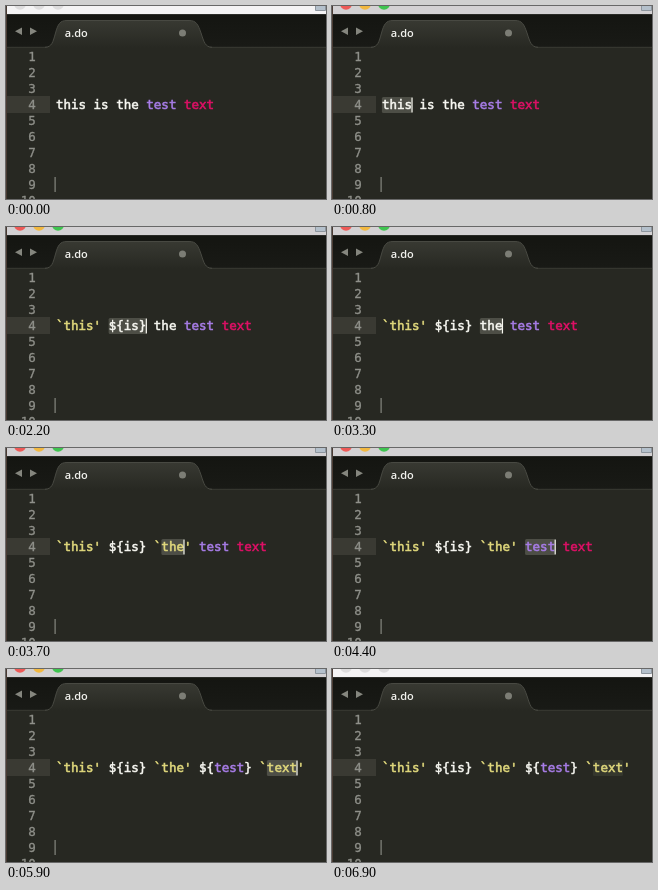
Animation, 320 px wide and 193 px high, one loop 7000 ms. Source, as an HTML page:

```html
<!DOCTYPE html>
<html lang="en">
<head>
<meta charset="utf-8">
<title>Wrapping words in an editor</title>
<style>
html, body { margin: 0; width: 100%; height: 100%; overflow: hidden; background: #272822; }
svg { display: block; width: 320px; height: 193px; }
.mono { font: 12.5px "DejaVu Sans Mono", monospace; }
#code text { stroke-width: .55px; }
#lines { fill: #8f908a; stroke: #8f908a; stroke-width: .3px; text-anchor: end; }
</style>
</head>
<body>
<svg viewBox="0 0 320 193">
  <defs>
    <linearGradient id="tabFill" x1="0" y1="0" x2="0" y2="1">
      <stop offset="0" stop-color="#383932"/>
      <stop offset="1" stop-color="#272822"/>
    </linearGradient>
    <linearGradient id="barFill" x1="0" y1="0" x2="0" y2="1">
      <stop offset="0" stop-color="#141511"/>
      <stop offset="1" stop-color="#191a16"/>
    </linearGradient>
  </defs>
  <rect width="320" height="193" fill="#272822"/>
  <rect id="title" width="320" height="8.300"/>
  <g id="lights">
    <circle cx="14" cy="-2.300" r="6"/>
    <circle cx="33" cy="-2.300" r="6"/>
    <circle cx="52" cy="-2.300" r="6"/>
  </g>
  <path d="M309.500 0V4.500H319.500V0" fill="#b4c0cb" stroke="#8d959d"/>
  <rect y="8.300" width="320" height="33" fill="url(#barFill)"/>
  <path d="M0 41.300H320" stroke="#3a3b34"/>
  <path d="M39 42C46 41 47 36 49.500 27C52 18 54 14.500 61 14.500H183C190 14.500 192 18 195 27C198 36 199 41 206 42Z" fill="url(#tabFill)"/>
  <path d="M39 41.300C46 41 47 36 49.500 27C52 18 54 14.500 61 14.500H183C190 14.500 192 18 195 27C198 36 199 41 206 41.300" fill="none" stroke="#484942"/>
  <path d="M16 21.500V29L9 25.250ZM24 21.500V29L31 25.250Z" fill="#85867e"/>
  <text x="58.800" y="31" font-family="Open Sans, sans-serif" font-size="11" font-weight="600" fill="#f2f2ee">a.do</text>
  <circle cx="176.500" cy="27" r="3.500" fill="#7c7d75"/>
  <rect y="90" width="44" height="17" fill="#3a3a33"/>
  <g id="lines" class="mono"></g>
  <rect id="sel" y="91" height="16" rx="1.500"/>
  <g id="code" class="mono"></g>
  <rect id="caret" y="91.500" width="1.200" height="15" fill="#f8f8f0"/>
  <rect x="48.500" y="171" width="1.200" height="15" fill="#85867f"/>
  <path d="M.5 0V193" stroke="#4b3c34"/>
</svg>
<script>
const LOOP = 7000, LEFT = 49.9, CELL = 7.535;
const WHITE = '#f8f8f2', YELLOW = '#e0d87c', PURPLE = '#a87de8', PINK = '#de1066';
const words = [
  ['this', WHITE, 'quote'],
  ['is', WHITE, 'brace'],
  ['the', WHITE, 'quote'],
  ['test', PURPLE, 'brace'],
  ['text', PINK, 'quote']
];

// start time, words wrapped, selected word, window active
const steps = [
  [0, 0, -1, false],
  [200, 0, -1, true],
  [600, 0, 0, true],
  [1300, 1, 0, true],
  [1700, 1, 1, true],
  [2000, 2, 1, true],
  [2900, 2, 2, true],
  [3500, 3, 2, true],
  [4100, 3, 3, true],
  [4600, 4, 3, true],
  [5300, 4, 4, true],
  [5900, 5, 4, true],
  [6600, 5, 4, false]
];

const $ = id => document.getElementById(id);
const put = (node, attrs) => {
  for (const key in attrs) node.setAttribute(key, attrs[key]);
  return node;
};
const colX = col => LEFT + col * CELL;

function addText(parent, text, x, y, fill) {
  const node = document.createElementNS('http://www.w3.org/2000/svg', 'text');
  node.textContent = text;
  put(node, { x, y });
  if (fill) put(node, { fill, stroke: fill });
  parent.append(node);
}

for (let n = 1; n <= 10; n++) {
  addText($('lines'), n, 29.8, 54.6 + (n - 1) * 16.05);
}

function pieces([word, color, kind], wrapped) {
  if (!wrapped) return [[word, color]];
  if (kind === 'quote') return [['`' + word + "'", YELLOW]];
  return [['${', WHITE], [word, color], ['}', WHITE]];
}

function draw([, wrapped, picked, active]) {
  const code = $('code');
  code.replaceChildren();
  let col = 0, from = 0, to = 0;
  words.forEach((word, i) => {
    const start = col;
    for (const [text, color] of pieces(word, i < wrapped)) {
      addText(code, text, colX(col), 103, color);
      col += text.length;
    }
    if (i === picked) {
      const inset = i < wrapped && word[2] === 'quote' ? 1 : 0;
      from = start + inset;
      to = col - inset;
    }
    col++;
  });
  put($('sel'), {
    x: colX(from),
    width: (to - from) * CELL,
    fill: active ? '#4d4e46' : '#35372d'
  });
  put($('caret'), { x: colX(to) - .6, opacity: active && to > 0 ? 1 : 0 });
  put($('title'), { fill: active ? '#d3d1d3' : '#f4f3f4' });
  const lights = active ? ['#ee5a57', '#f2b840', '#3fc450'] : Array(3).fill('#dddcdd');
  [...$('lights').children].forEach((dot, i) => put(dot, { fill: lights[i] }));
}

let shown;
function render(time) {
  const t = time % LOOP;
  const step = steps.findLast(s => s[0] <= t);
  if (step !== shown) draw(shown = step);
}

const begin = performance.now();
function tick() {
  render(performance.now() - begin);
  requestAnimationFrame(tick);
}
tick();
</script>
</body>
</html>
```
